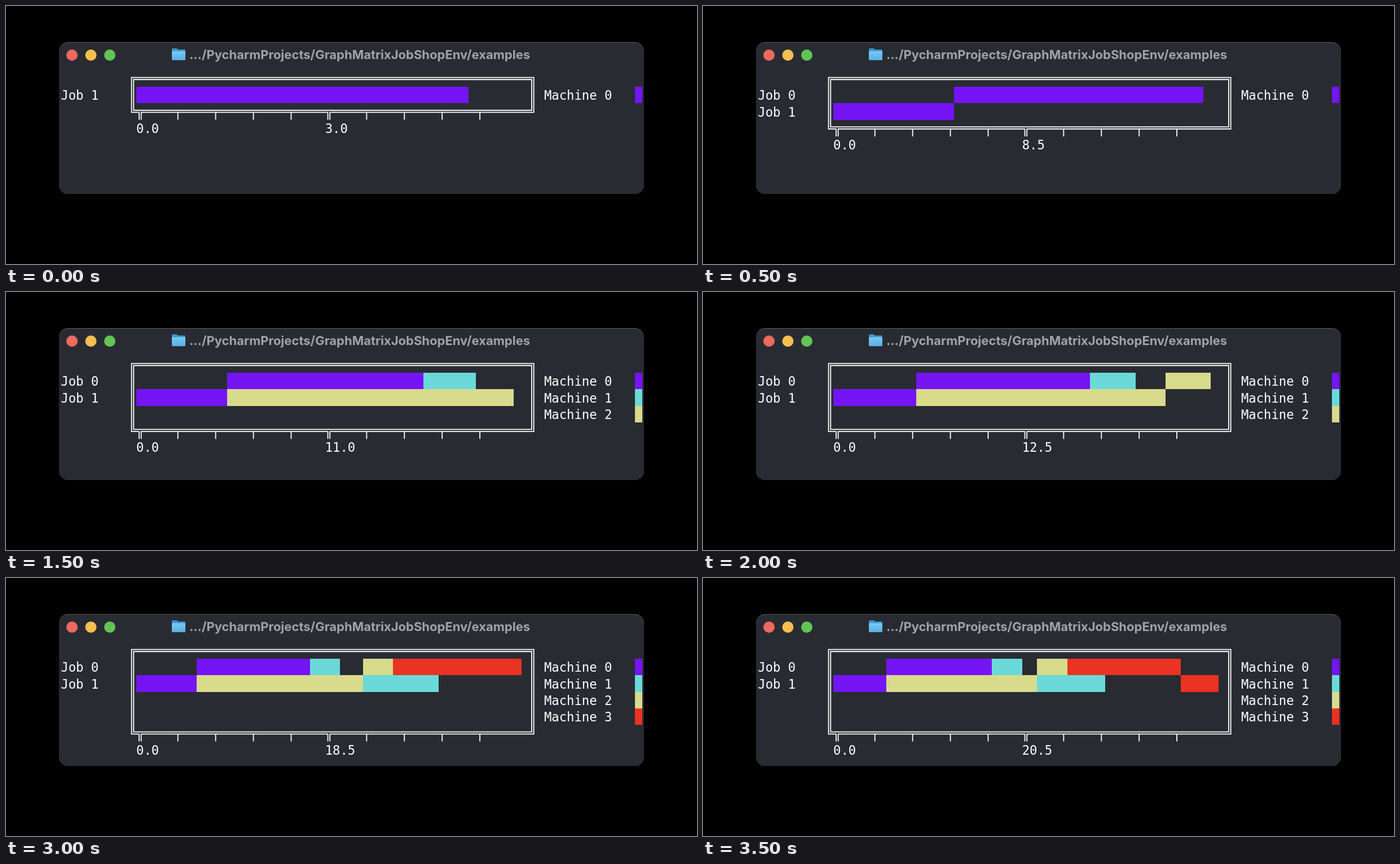
Animation of 1225 by 457 pixels, one loop 4.5 s. Source, as an HTML page:

```html
<!DOCTYPE html>
<html lang="en">
<head>
<meta charset="utf-8">
<title>Job shop schedule</title>
<style>
  html, body { margin: 0; width: 100%; height: 100%; overflow: hidden; background: #000; }
  svg { display: block; width: 1225px; height: 457px; }
  .title { font: 700 22px Inter, "Liberation Sans", sans-serif; font-optical-sizing: none; fill: #a1a3a9; }
  #chart text { font: 22.23px "DejaVu Sans Mono", monospace; fill: #fff; white-space: pre; }
  #chart path { fill: none; stroke: #fff; stroke-width: 1.8; }
  #chart rect { shape-rendering: crispEdges; }
</style>
</head>
<body>
<svg viewBox="0 0 1225 457">
  <defs>
    <linearGradient id="blue" x2="0" y2="1">
      <stop offset="0" stop-color="#7cc9f3"/>
      <stop offset="1" stop-color="#55aee6"/>
    </linearGradient>
  </defs>
  <rect x="94" y="64" width="1037" height="269" rx="16" fill="#5b5d63"/>
  <path d="M94 81a16 16 0 0 1 16-16H1115a16 16 0 0 1 16 16V317a16 16 0 0 1-16 16H110a16 16 0 0 1-16-16Z" fill="#292b32"/>
  <circle cx="117" cy="87" r="10" fill="#ec6a5e"/>
  <circle cx="150.5" cy="87" r="10" fill="#f4bf4f"/>
  <circle cx="184" cy="87" r="10" fill="#61c554"/>
  <path d="M294 77q0-2 2-2h6q1 0 2 1l1 1h11q2 0 2 2v15q0 2-2 2h-20q-2 0-2-2Z" fill="#3d96cf"/>
  <rect x="294" y="80" width="24" height="16" rx="1.5" fill="url(#blue)"/>
  <text class="title" x="627" y="94" text-anchor="middle">.../PycharmProjects/GraphMatrixJobShopEnv/examples</text>
  <g id="chart"></g>
</svg>
<script>
const STEP = 500, LOOP = 4500;
const CELL = 13.385, LEFT = 97.25, ROW = 29.3, TOP = 143, GAP = 1.85;
const COLORS = ['#7514f5', '#6bd9da', '#d8db8b', '#ea3323'];

// job, machine, start, end; one operation is added per step
const OPS = [
  [1, 0, 0, 5], [0, 0, 5, 16], [0, 1, 16, 19], [1, 2, 5, 21],
  [0, 2, 21, 24], [1, 1, 21, 28], [0, 3, 24, 36], [1, 3, 36, 40]
];

const chart = document.getElementById('chart');
const colX = c => LEFT + c * CELL;
const rowY = r => TOP + r * ROW;
const unique = list => [...new Set(list)].sort();

const label = (c, r, s) => `<text x="${colX(c)}" y="${rowY(r) + 23.2}">${s}</text>`;

function bar(from, to, r, machine) {
  const x = Math.round(colX(from)), y = Math.round(rowY(r));
  const w = Math.round(colX(to)) - x, h = Math.round(rowY(r + 1)) - y;
  return `<rect x="${x}" y="${y}" width="${w}" height="${h}" fill="${COLORS[machine]}"/>`;
}

function frame(rows) {
  const l = colX(9.5), r = colX(62.5), t = 128.4, b = rowY(rows) + 14.3;
  const low = b + GAP, end = rowY(rows + 1);
  const [il, ir, it, ib] = [l + GAP, r - GAP, t + GAP, b - GAP];
  let d = `M${il} ${it}H${ir}V${ib}H${il}Z`;
  d += `M${l - GAP} ${low}V${t - GAP}H${r + GAP}V${low}`;
  // The lower line opens between the two strokes of each major tick
  let pen = `M${l - GAP - 0.9} ${low}`;
  for (let c = 10; c <= 55; c += 5) {
    const x = colX(c + 0.5);
    if (c === 10 || c === 35) {
      pen += `H${x - GAP}V${end}M${x + GAP} ${end}V${low}`;
    } else {
      d += `M${x} ${low}V${end}`;
    }
  }
  return `<path d="${d}${pen}H${r + GAP + 0.9}"/>`;
}

function draw(step) {
  const ops = OPS.slice(0, step + 1);
  const total = OPS[step][3] + 1;
  const jobs = unique(ops.map(o => o[0]));
  const machines = unique(ops.map(o => o[1]));
  const rows = Math.max(jobs.length, machines.length);
  const scale = t => t * 52 / total;

  let out = frame(rows);
  for (const [job, machine, start, end] of ops) {
    out += bar(10 + Math.ceil(scale(start)), 11 + Math.floor(scale(end)), jobs.indexOf(job), machine);
  }
  jobs.forEach((j, r) => out += label(0, r, 'Job ' + j));
  machines.forEach((m, r) => out += label(64, r, 'Machine ' + m) + bar(76, 77, r, m));
  out += label(10, rows + 1, '0.0') + label(35, rows + 1, (total / 2).toFixed(1));
  chart.innerHTML = out;
}

let shown = -1;
const began = performance.now();

function tick() {
  const t = (performance.now() - began) % LOOP;
  const step = Math.min(OPS.length - 1, Math.floor(t / STEP));
  if (step !== shown) draw(shown = step);
  requestAnimationFrame(tick);
}
tick();
</script>
</body>
</html>
```
